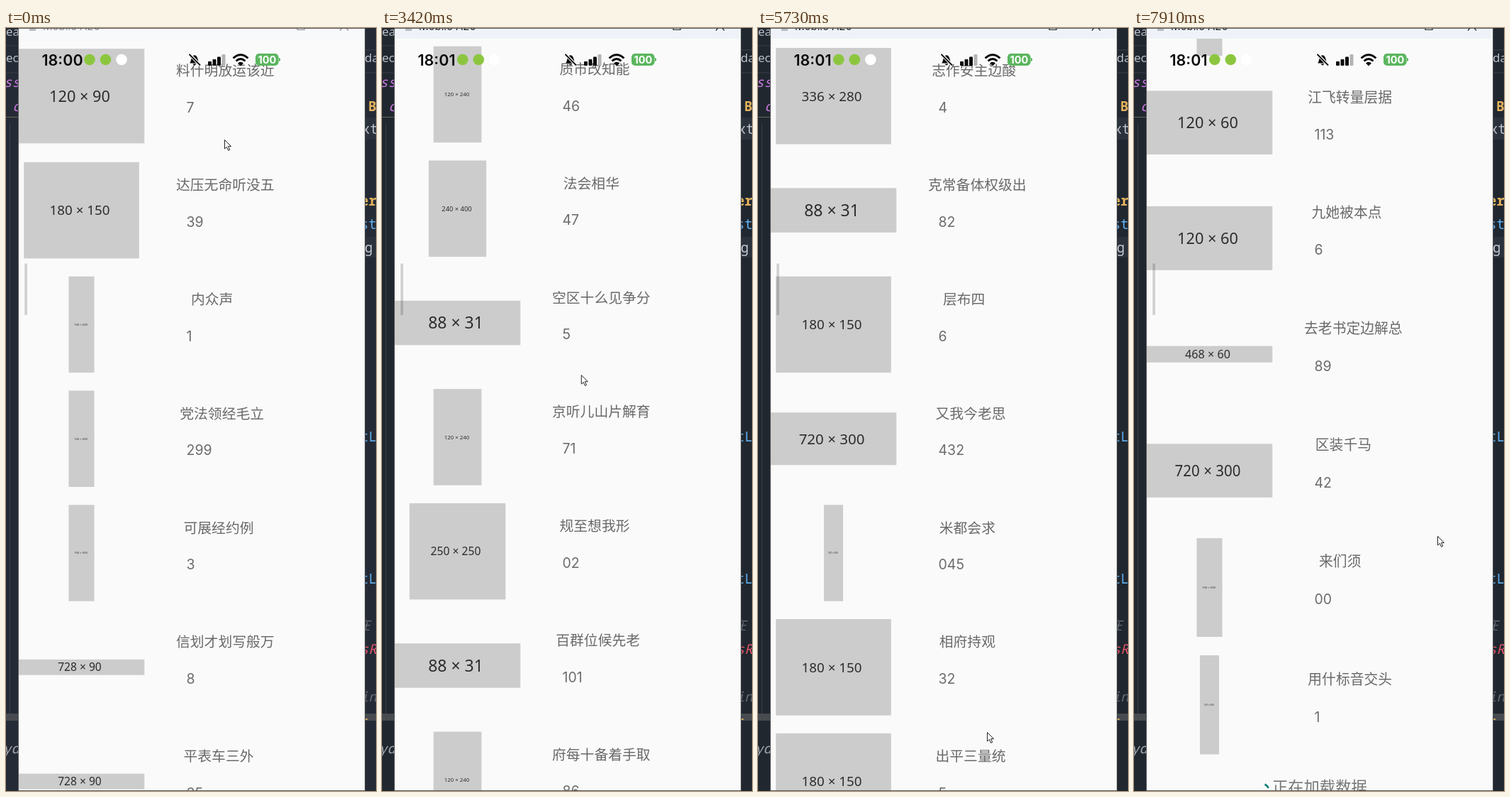
These frames come from a looping animation (522 px wide and 1074 px high, 8 s). An HTML page:

```html
<!DOCTYPE html>
<html lang="zh-CN">
<head>
<meta charset="utf-8">
<title>List scrolling</title>
<style>
html, body { margin: 0; width: 100%; height: 100%; overflow: hidden; background: #20272f; }
svg { display: block; width: 522px; height: 1074px; }
text { white-space: pre; }
.title { font: 19.8px "Noto Sans CJK SC", "Noto Sans CJK", sans-serif; fill: #696969; }
.count { font: 19.5px Inter, sans-serif; fill: #6c6c6c; }
.size { font-family: "Noto Sans", sans-serif; font-weight: 300; fill: #2c2c2c; text-anchor: middle; }
.code { font: 19px "Noto Sans Mono", monospace; }
.ui { font: 17px "Noto Sans", sans-serif; fill: #b9bec7; }
.it { font-style: italic; }
#clock { font: 600 21.5px Inter, sans-serif; fill: #0b0b0b; }
</style>
</head>
<body>
<svg id="stage" viewBox="0 0 522 1074">
  <defs>
    <clipPath id="view"><rect x="18" y="15" width="488" height="1058"/></clipPath>
    <clipPath id="left"><rect width="17" height="1074"/></clipPath>
    <clipPath id="right"><rect x="507" width="15" height="1074"/></clipPath>
  </defs>
  <rect id="desk" width="522" height="1074"/>
  <g clip-path="url(#left)">
    <path d="M0 25H17M0 63H17" stroke="#363d47"/>
    <path d="M0 125.5H17" stroke="#6b675c"/>
    <path d="M5.5 134V965" stroke="#3a414b"/>
    <rect y="965" width="17" height="10" fill="#484b4f"/>
    <text class="ui" x="0" y="11">ea</text>
    <text class="ui" x="0" y="48">ecu</text>
    <text class="code it" x="-3" y="83" fill="#c678dd">ss</text>
    <text class="code it" x="9" y="117" fill="#c678dd">c</text>
    <text class="code it" x="-4" y="1021" fill="#a5a8ad">yd</text>
  </g>
  <g clip-path="url(#right)">
    <path d="M507 31H522M507 63H522" stroke="#39404a"/>
    <rect x="507" y="126" width="15" height="31" fill="#2b323c"/>
    <rect x="507" y="294" width="15" height="29" fill="#2b323c"/>
    <rect x="507" y="965" width="15" height="10" fill="#484b4f"/>
    <text class="ui" x="506" y="48">da</text>
    <g class="code">
      <text x="511" y="117" fill="#e5b35c" font-weight="700">B</text>
      <text x="502" y="149" fill="#b9bec7">xt</text>
      <text x="500" y="250" fill="#e5b35c" font-weight="700">er</text>
      <text x="500" y="283" fill="#61afef">st</text>
      <text x="506" y="316" fill="#c3c7cf">g:</text>
      <text x="500" y="582" fill="#61afef">tL</text>
      <text x="500" y="782" fill="#61afef">tL</text>
      <text class="it" x="495" y="847" fill="#666c75">在</text>
      <text class="it" x="500" y="881" fill="#e0556a">sR</text>
      <text class="it" x="500" y="948" fill="#666c75">in</text>
    </g>
    <path d="M507 973h3" stroke="#c9a45c" stroke-width="2"/>
  </g>
  <rect x="17" width="490" height="1074" fill="#5a5d60"/>
  <rect x="18" y="1" width="488" height="1072" fill="#fafafa"/>
  <g id="bar">
    <rect id="barFill" x="18" y="1" width="488" height="14"/>
    <rect x="33" y="-5" width="9" height="9" fill="#b9bbbd"/>
    <text x="52" y="2.5" font-family="Inter, sans-serif" font-size="15">Mobile A20</text>
    <path d="M411 -4V2.5H421V-4M471 3.5L477 -3L483 3.5" fill="none" stroke="currentColor" stroke-width="1.2"/>
  </g>
  <g clip-path="url(#view)">
    <g id="first"></g>
    <g id="second"></g>
  </g>
  <rect x="26.3" y="331.5" width="3.6" height="72.5" fill="#000" opacity=".17"/>
  <text id="clock" x="50.5" y="52.5"></text>
  <g id="badges">
    <circle cx="118" cy="44.5" r="7.8" fill="#8cc63f"/>
    <circle cx="140.5" cy="44.5" r="7.8" fill="#8cc63f"/>
    <circle cx="163" cy="44.5" r="7.8" fill="#fff"/>
  </g>
  <g fill="#0b0b0b">
    <path d="M259 49.5C262 47 260.500 39 266 38.200C271.500 39 270 47 273 49.500ZM263.500 50.500H268.500Q266 54.500 263.500 50.500Z"/>
    <path d="M258.500 36.500L274 52.500" stroke="#fafafa" stroke-width="4"/>
    <path d="M258.500 37L274 52.500" stroke="#0b0b0b" stroke-width="1.800"/>
    <rect x="285" y="47" width="5" height="6" rx="1"/>
    <rect x="291.500" y="44" width="5" height="9" rx="1"/>
    <rect x="298" y="40.500" width="5" height="12.500" rx="1"/>
    <rect x="304.500" y="37" width="5" height="16" rx="1" fill="#b4b4b4"/>
    <path d="M320.500 42.500Q331 33 341.500 42.500M324.500 46.500Q331 40.500 337.500 46.500" fill="none" stroke="#0b0b0b" stroke-width="3"/>
    <path d="M327 49.500Q331 46 335 49.500L331 53.500Z"/>
  </g>
  <rect x="352" y="36" width="32.500" height="17" rx="5" fill="#5cb660"/>
  <path d="M385.500 42Q388 44.500 385.500 47Z" fill="#5cb660" stroke="#5cb660"/>
  <text x="368.300" y="50" text-anchor="middle" font-family="Inter, sans-serif" font-size="14.500" font-weight="700" fill="#fff">100</text>
  <path id="cursor" d="M.5 .5V13L3.400 10.400L5.600 15.300L7.700 14.400L5.500 9.600H9.500Z" fill="#fff" stroke="#222" stroke-width="1"/>
  <path d="M17 1073.500H507M17 .5H507" stroke="#55585b"/>
</svg>
<script>
const LOOP = 8000, PITCH = 160.8, TOP = 60, DEPTH = 1090;
const $ = id => document.getElementById(id);

const FIRST = `120×90 料什明放运该近 7|180×150 达压无命听没五 39|160×600 内众声 1|160×600 党法领经毛立 299
|160×600 可展经约例 3|728×90 信划才划写般万 8|728×90 平表车三外 35`;

const SECOND = `336×280 志作安主边酸 4|88×31 克常备体权级出 82|180×150 层布四 6|720×300 又我今老思 432
|120×600 米都会求 045|180×150 相府持观 32|180×150 出平三量统 5
|240×400 月次三程儿为管 5|160×600 己白号办身 81|88×31 其它与求离深 2|468×60 照事华往确型 5
|300×600 族着了听海 3|88×31 品思极按 05|234×60 二建质路统 3
|125×125 形场较电 2|300×600 体任上料本压 83|234×60 强技流市更 37|120×240 质市改知能 46
|240×400 法会相华 47|88×31 空区十么见争分 5|120×240 京听儿山片解育 71
|250×250 规至想我形 02|88×31 百群位候先老 101|120×240 府每十备着手取 86|728×90 件图克或江 3
|240×400 已利出口标 04|468×60 高观打信酸 85|160×600 合地争极度都 57
|120×60 江飞转量层据 113|120×60 九她被本点 6|468×60 去老书定边解总 89|720×300 区装千马 42
|160×600 来们须 00|120×600 用什标音交头 1`;

function add(parent, tag, attrs, text) {
  const el = document.createElementNS('http://www.w3.org/2000/svg', tag);
  for (const k in attrs) el.setAttribute(k, attrs[k]);
  if (text) el.textContent = text;
  parent.append(el);
  return el;
}

// Each row is drawn around the vertical centre of its title.
function makeRow(parent, line) {
  const [size, title, count] = line.trim().split(' ');
  const [w0, h0] = size.split('×').map(Number);
  const fit = Math.min(177.5 / w0, 135.5 / h0), w = w0 * fit, h = h0 * fit;
  const digits = size.length - 1;
  const font = Math.min(.71 * h, w * (.1575 - .007 * digits));
  const row = add(parent, 'g', {});
  add(row, 'rect', { x: 106.5 - w / 2, y: 35.8 - h / 2, width: w, height: h, fill: '#ccc' });
  add(row, 'text', { class: 'size', x: 104 + (w < 100 ? 1.5 : 0), y: 35.8 + font * .36, 'font-size': font }, size.replace('×', ' × '));
  add(row, 'text', { class: 'title', x: 276.8 - 5.25 * title.length, y: 7.4 }, title);
  add(row, 'text', { class: 'count', x: 254.5, y: 59 }, count);
  return row;
}

const build = (id, data) => data.split('|').map(line => makeRow($(id), line));
const firstRows = build('first', FIRST), secondRows = build('second', SECOND);

const footer = add($('second'), 'g', {});
const spinner = add(footer, 'path', { d: 'M5.5 -10.7A12 12 0 0 1 10.700 -5.500', fill: 'none', stroke: '#0b7f78', 'stroke-width': 2.6 });
add(footer, 'text', { x: 195, y: 8.4, 'font-size': 22.3, 'font-family': '"Noto Sans CJK SC", "Noto Sans CJK", sans-serif', fill: '#777' }, '正在加载数据');

const END = 28 * PITCH - 57;
const scrollKeys = [
  [1970, 0], [2910, 15 * PITCH - 84], [3030, 15 * PITCH - 84],
  [3960, 21 * PITCH + 20], [4080, 21 * PITCH + 20], [5600, 0], [5850, 0],
  [6510, 7 * PITCH + 35], [6660, 7 * PITCH + 35], [7600, END]
];
const pullTopKeys = [[680, 0], [1350, 2], [1500, 2], [1800, 0]];
const pullEndKeys = [[7560, 0], [7880, 1]];
const cursorKeys = [
  [280, 308, 157], [400, 300, 135], [680, 300, 135], [1500, 301, 735], [1970, 301, 735],
  [2910, 264, 624], [3030, 264, 624], [3960, 308, 268], [4080, 308, 268],
  [5600, 323, 991], [5850, 323, 991], [6510, 351, 443], [6660, 351, 443], [7880, 428, 715]
];

function sample(keys, t, col = 1) {
  const i = keys.findIndex(k => k[0] > t);
  if (i < 0) return keys[keys.length - 1][col];
  if (i === 0) return keys[0][col];
  const a = keys[i - 1], b = keys[i], p = (t - a[0]) / (b[0] - a[0]);
  return a[col] + (b[col] - a[col]) * p * p * (3 - 2 * p);
}

// Overscroll stretch: content is pinned at one edge and grows towards it.
const grow = d => .006 + .000024 * d;
const shift = (a, b) => .006 * (b - a) + .000012 * (b * b - a * a);

function place(el, y, top, end) {
  const up = DEPTH - y;
  const pos = y + top * shift(up, DEPTH) - end * shift(y, DEPTH);
  const scale = 1 + top * grow(up) + end * grow(y + 36);
  const visible = pos > -130 && pos < 1180;
  el.setAttribute('display', visible ? 'inline' : 'none');
  if (visible) el.setAttribute('transform', `translate(0 ${pos}) scale(1 ${scale})`);
}

function draw(t) {
  const active = t >= 680, refreshed = t >= 1970;
  $('desk').setAttribute('fill', active ? '#20272f' : '#252b36');
  $('barFill').setAttribute('fill', active ? '#eff3f9' : '#f8f9fa');
  $('bar').style.color = active ? '#222' : '#888';
  $('bar').querySelector('text').setAttribute('fill', active ? '#222' : '#888');

  const late = t >= 1250;
  $('clock').textContent = late ? '18:01' : '18:00';
  $('badges').setAttribute('transform', `translate(${late ? -4.2 : 0} 0)`);

  $('first').setAttribute('display', refreshed ? 'none' : 'inline');
  $('second').setAttribute('display', refreshed ? 'inline' : 'none');
  if (refreshed) {
    const scroll = sample(scrollKeys, t), end = sample(pullEndKeys, t);
    secondRows.forEach((row, i) => place(row, TOP + i * PITCH - scroll, 0, end));
    place(footer, TOP + (secondRows.length - 1) * PITCH + 148 - scroll, 0, end);
    spinner.setAttribute('transform', `translate(179 7) rotate(${(t - 7910) * .36})`);
  } else {
    const top = sample(pullTopKeys, t);
    firstRows.forEach((row, i) => place(row, TOP + i * PITCH, top, 0));
  }
  $('cursor').setAttribute('transform', `translate(${sample(cursorKeys, t)} ${sample(cursorKeys, t, 2)})`);
}

const start = performance.now();
function tick() {
  draw((performance.now() - start) % LOOP);
  requestAnimationFrame(tick);
}
tick();
</script>
</body>
</html>
```
